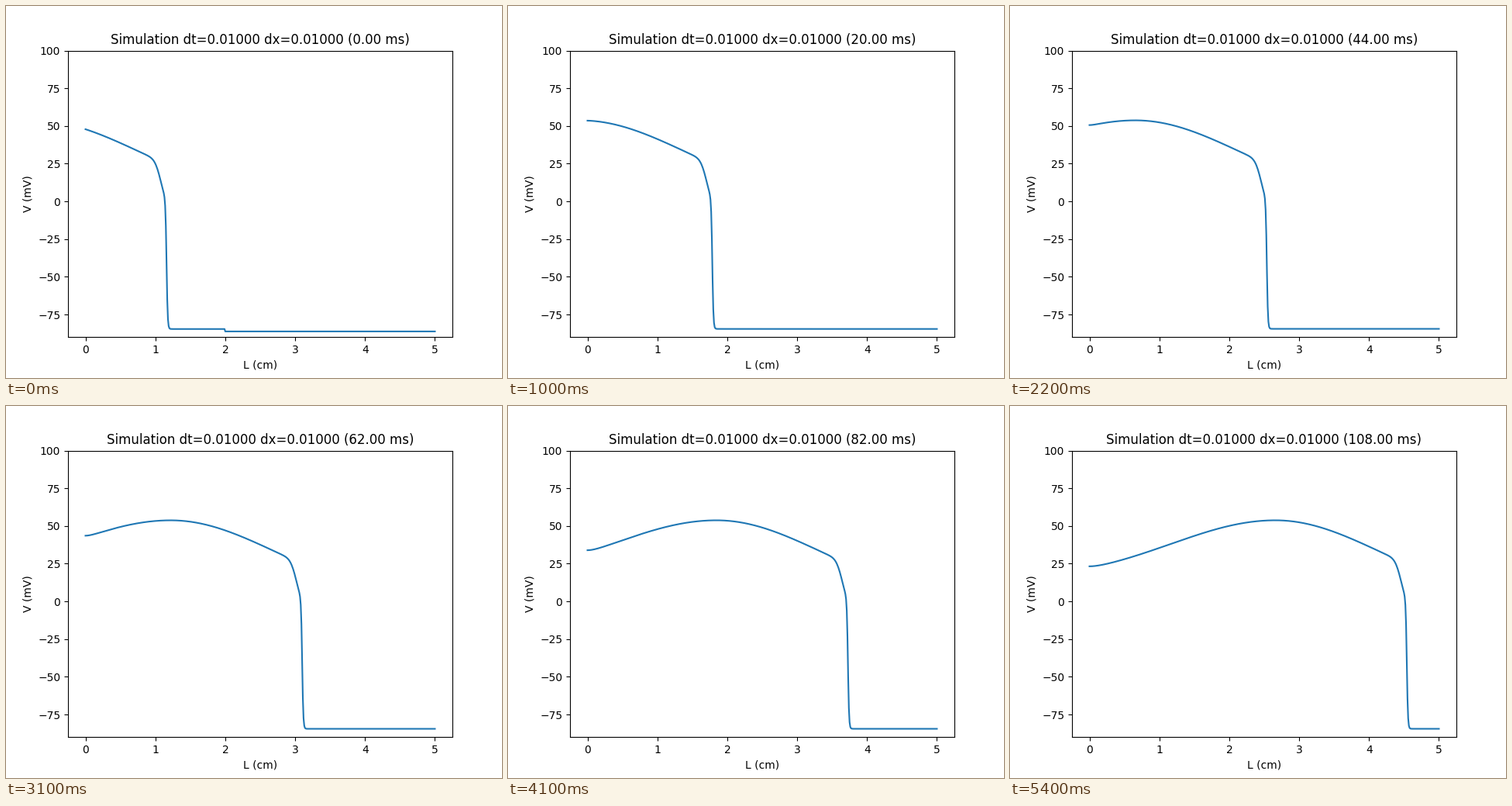
Write a matplotlib script that moves like this. It is 640x480 px and loops after 5500 ms.

```python
import numpy as np
import matplotlib.pyplot as plt
from matplotlib.animation import FuncAnimation

FRAMES, INTERVAL, STEP_MS = 55, 100, 2.0
START, SPEED = 1.16, 0.0313         # front position (cm) and speed (cm/ms)
REST, PEAK = -84.5, 53.8            # mV
PEAK_DIST, HUMP_WIDTH = 1.88, 1.5   # peak behind the front, in cm
RISE, FALL = 53, 40                 # hump height ahead of and behind the peak
NOTCH, NOTCH_WIDTH = 22, 0.115      # rounded shoulder behind the front
STEEPNESS = 125                     # of the upstroke, per cm


def wave(d):
    """Potential at distance d (cm) behind the front."""
    behind = np.maximum(d, 0)
    z = (behind - PEAK_DIST) / HUMP_WIDTH
    height = np.where(z < 0, RISE, FALL)
    plateau = PEAK - height * (1 - np.exp(-z ** 2 / 2))
    plateau -= NOTCH * np.exp(-(behind / NOTCH_WIDTH) ** 2)
    upstroke = 0.5 * (1 + np.tanh(STEEPNESS * d / 2))
    return REST + (plateau - REST) * upstroke


def potential(x, t):
    front = START + SPEED * t
    v = wave(front - x)
    # the sealed left end flattens the slope over a growing reach
    reach = 0.0011 * (t + 1)
    slope = (wave(front - 0.01) - wave(front + 0.01)) / 0.02
    v += reach * slope * np.exp(-x / reach)
    # the right part starts lower, then relaxes and blurs
    blur = np.sqrt(0.001 ** 2 + 0.004 * t)
    v -= 0.8 * np.exp(-t / 5) * (1 + np.tanh((x - 1.995) / blur))
    return v - 0.15 * np.exp(-t / 30)


x = np.linspace(0, 5, 501)
fig, ax = plt.subplots(figsize=(6.4, 4.8), dpi=100)
line, = ax.plot(x, potential(x, 0.0))
ax.set_xlim(-0.25, 5.25)
ax.set_ylim(-90, 100)
ax.set_xlabel("L (cm)")
ax.set_ylabel("V (mV)")
title = ax.set_title("")


def update(frame):
    t = frame * STEP_MS
    line.set_ydata(potential(x, t))
    title.set_text(f"Simulation dt=0.01000 dx=0.01000 ({t:.2f} ms)")
    return line, title


anim = FuncAnimation(fig, update, frames=FRAMES, interval=INTERVAL,
                     repeat=True, repeat_delay=0)
plt.show()
```
